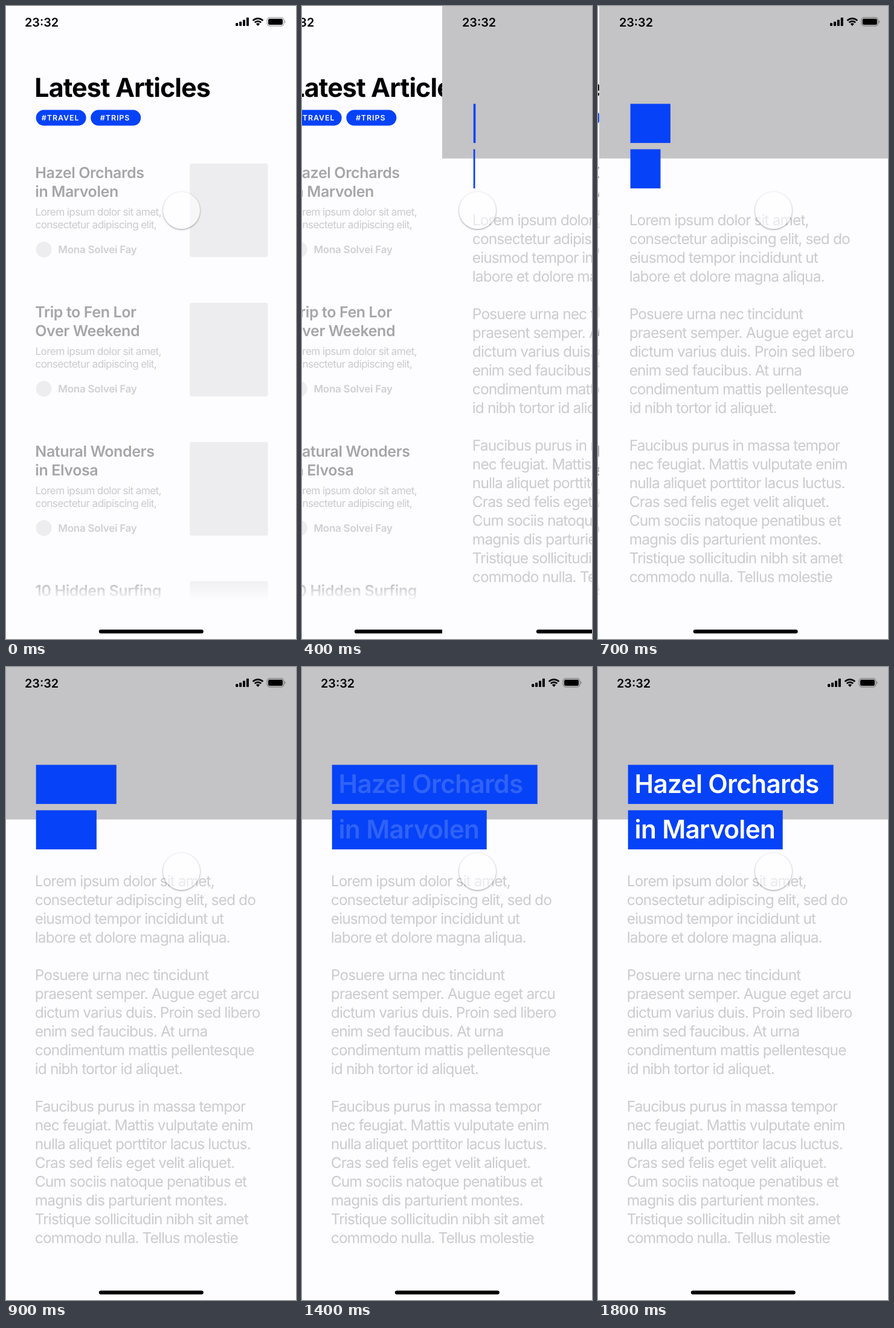
Write an HTML page that moves like this. It is 480 by 1045 pixels and loops after 1900 ms.

```html
<!DOCTYPE html>
<html lang="en">
<head>
<meta charset="utf-8">
<title>Latest Articles</title>
<style>
  html, body { margin: 0; width: 100%; height: 100%; overflow: hidden; background: #fdfcff; }
  svg { position: absolute; left: 0; top: 0; display: block; }
  text {
    font-family: Inter, Roboto, sans-serif;
    font-optical-sizing: none;
    text-rendering: geometricPrecision;
    white-space: pre;
  }
  .clock { font-size: 19.8px; font-weight: 600; }
  .heading { font-size: 43px; font-weight: 700; letter-spacing: -0.022em; }
  .tag { font-size: 12.5px; font-weight: 600; letter-spacing: 0.9px; fill: #fff; }
  .name { font-size: 25px; font-weight: 600; letter-spacing: -0.016em; fill: #a6a5a7; }
  .intro { font-size: 17.2px; letter-spacing: -0.037em; fill: #cbcacd; }
  .author { font-size: 17px; font-weight: 600; letter-spacing: -0.015em; fill: #d0cfd2; }
  .body { font-size: 24.5px; letter-spacing: -0.037em; fill: #cccbce; }
  .hero { font-size: 42.3px; font-weight: 600; letter-spacing: -0.016em; fill: #fff; }
  #touch {
    position: absolute; left: 259.5px; top: 306.5px; width: 61px; height: 61px;
    border-radius: 50%;
    background: rgba(255, 255, 255, 0.6);
    box-shadow: 0 1px 3px rgba(0, 0, 0, 0.42);
  }
</style>
</head>
<body>
<svg width="480" height="1045" viewBox="0 0 480 1045">
  <defs>
    <linearGradient id="fade" x2="0" y2="1">
      <stop offset="0" stop-color="#fdfcff" stop-opacity="0"/>
      <stop offset="1" stop-color="#fdfcff"/>
    </linearGradient>
  </defs>
  <g id="list"></g>
  <g id="detail"></g>
</svg>
<div id="touch"></div>
<script>
const PAPER = '#fdfcff', BLUE = '#0642f7', TILE = '#edecee', HEADER = '#c4c3c5';
const WIDTH = 482, PARALLAX = 130;
const LOOP = 1900, STEP = 100;

const $ = id => document.getElementById(id);
const text = (cls, x, y, s) => `<text class="${cls}" x="${x}" y="${y}">${s}</text>`;
const rect = (x, y, w, h, fill, r = 0, extra = '') =>
  `<rect x="${x}" y="${y}" width="${w}" height="${h}" rx="${r}" fill="${fill}" ${extra}/>`;

// Ring sector opening upwards, used for the wifi symbol.
function arc(r) {
  const d = r * Math.SQRT1_2;
  return `<path d="M${417 - d} ${32.5 - d}A${r} ${r} 0 0 1 ${417 + d} ${32.5 - d}"
    fill="none" stroke="#000" stroke-width="2.7"/>`;
}

function chrome() {
  const signal = [5, 7.3, 10.3, 14]
    .map((h, i) => rect(380.2 + i * 5.9, 33 - h, 4, h, '#000', 1)).join('');
  const wifi = arc(11.8) + arc(7.4) +
    '<path d="M417 33L413.9 29.6A4.4 4.4 0 0 1 420.1 29.6Z"/>';
  const battery = rect(432.2, 19.2, 27.6, 13.6, 'none', 4, 'stroke="#000" stroke-opacity=".4" stroke-width="1.2"') +
    rect(434, 21, 24, 10, '#000', 2.2) +
    '<path d="M461.2 23.6A3 3 0 0 1 461.2 28.4Z" fill-opacity=".45"/>';
  return text('clock', 31, 34.3, '23:32') + signal + wifi + battery +
    rect(153.8, 1029.4, 173, 6.4, '#000', 3.2);
}

function card(lines, i) {
  const y = 260 + i * 229.9;
  return rect(304.3, y, 129.2, 154.5, TILE, 3) +
    lines.map((s, n) => text('name', 48.3, y + 24.3 + n * 31, s)).join('') +
    text('intro', 48.5, y + 86.4, 'Lorem ipsum dolor sit amet,') +
    text('intro', 48.5, y + 107.1, 'consectetur adipiscing elit,') +
    `<circle cx="62.6" cy="${y + 142}" r="13" fill="${TILE}"/>` +
    text('author', 86.3, y + 148.2, 'Mona Solvei Fay');
}

const pill = (x, textX, s) => rect(x, 171.6, 83, 26, BLUE, 13) + text('tag', textX, 189, s);

const title = ['Hazel Orchards', 'in Marvolen'];
const cards = [
  title,
  ['Trip to Fen Lor', 'Over Weekend'],
  ['Natural Wonders', 'in Elvosa'],
  ['10 Hidden Surfing']
];

const paragraphs = [
  `Lorem ipsum dolor sit amet,
consectetur adipiscing elit, sed do
eiusmod tempor incididunt ut
labore et dolore magna aliqua.`,
  `Posuere urna nec tincidunt
praesent semper. Augue eget arcu
dictum varius duis. Proin sed libero
enim sed faucibus. At urna
condimentum mattis pellentesque
id nibh tortor id aliquet.`,
  `Faucibus purus in massa tempor
nec feugiat. Mattis vulputate enim
nulla aliquet porttitor lacus luctus.
Cras sed felis eget velit aliquet.
Cum sociis natoque penatibus et
magnis dis parturient montes.
Tristique sollicitudin nibh sit amet
commodo nulla. Tellus molestie`
];

$('list').innerHTML =
  text('heading', 47.3, 150.3, 'Latest Articles') +
  pill(49.6, 58.8, '#TRAVEL') + pill(140.2, 155.8, '#TRIPS') +
  cards.map(card).join('') +
  rect(0, 943, 480, 38, 'url(#fade)') + rect(0, 980.5, 480, 65, PAPER) +
  chrome();

$('detail').innerHTML =
  rect(-2, 0, 486, 1045, PAPER) + rect(-2, 0, 486, 251.7, HEADER) +
  rect(49.7, 161.5, 0, 64.6, BLUE, 0, 'id="bar0"') +
  rect(49.7, 236.5, 0, 64.6, BLUE, 0, 'id="bar1"') +
  `<g id="hero">${title.map((s, n) => text('hero', 60.6, 208 + n * 75, s)).join('')}</g>` +
  paragraphs.join('\n\n').split('\n')
    .map((s, n) => text('body', 47.8, 362 + n * 31, s)).join('') +
  chrome();

const clamp = v => Math.min(1, Math.max(0, v));
const smooth = u => u * u * (3 - 2 * u);

// Distance left to travel, from 1 to 0, for a slightly underdamped spring.
function spring(ms) {
  if (ms <= 0) return 1;
  const zeta = 0.935, w = 0.01385, q = Math.sqrt(1 - zeta * zeta), u = w * ms;
  return Math.exp(-zeta * u) * (Math.cos(q * u) + zeta / q * Math.sin(q * u));
}

// Piecewise linear value through [time, value] pairs.
function through(keys, t) {
  if (t <= keys[0][0]) return keys[0][1];
  for (let i = 1; i < keys.length; i++) {
    const [t0, a] = keys[i - 1], [t1, b] = keys[i];
    if (t < t1) return a + (b - a) * (t - t0) / (t1 - t0);
  }
  return keys[keys.length - 1][1];
}

const barPace = [[318, 0], [700, 0.283], [900, 0.427], [1350, 1]];

function draw(t) {
  const left = t < 900 ? spring(t - 280) : 0;
  $('detail').setAttribute('transform', `translate(${WIDTH * left})`);
  $('list').setAttribute('transform', `translate(${-PARALLAX * (1 - left)})`);

  const grow = smooth(through(barPace, t));
  $('bar0').setAttribute('width', 340 * grow);
  $('bar1').setAttribute('width', 256 * grow);
  $('hero').setAttribute('opacity', smooth(clamp((t - 1260) / 540)));
}

const start = performance.now();
const SLACK = 20; // keeps a step from arriving one refresh late

function tick(now) {
  const t = (Math.max(0, now - start) + SLACK) % LOOP;
  draw(Math.floor(t / STEP) * STEP);
  requestAnimationFrame(tick);
}

draw(0);
requestAnimationFrame(tick);
</script>
</body>
</html>
```
